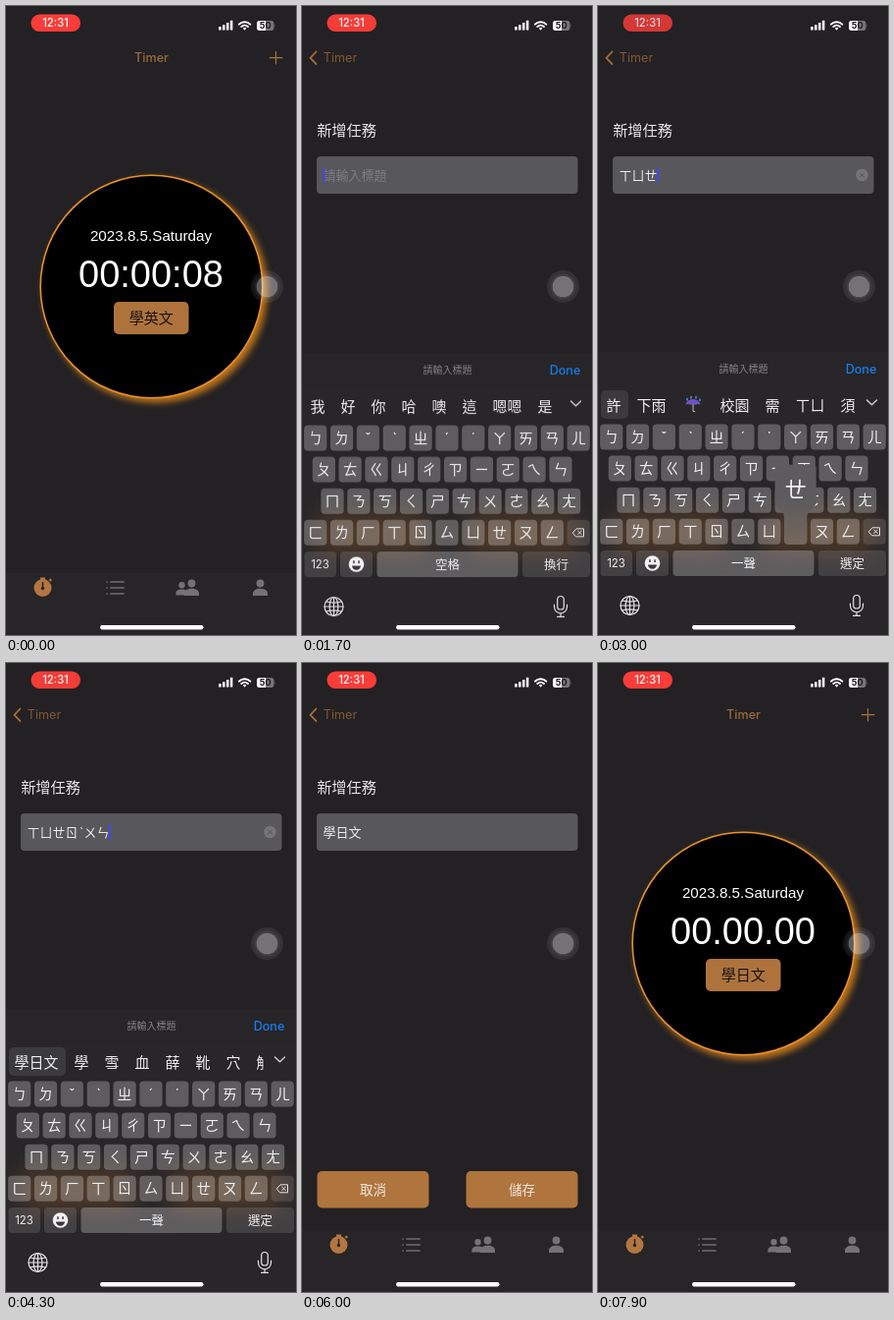
Animation, 296 px wide and 640 px high, one loop 8000 ms. Source, as an HTML page:

```html
<!DOCTYPE html>
<html lang="zh-Hant">
<head>
<meta charset="utf-8">
<title>Timer</title>
<style>
html, body { margin: 0; width: 100%; height: 100%; overflow: hidden; background: #232124; }
svg { display: block; width: 100vw; height: 100vh; }
text { font-family: Inter, "Noto Sans CJK TC", "Noto Sans CJK", sans-serif; text-anchor: middle; }
.helv { font-family: "Liberation Sans", Arial, sans-serif; fill: #fff; }
.line { fill: none; stroke-linecap: round; stroke-linejoin: round; }
.page, .under, .title, .back, .plus, .keys { animation: 8s infinite both; }
.page { animation-name: page; }
.under { animation-name: under; }
.title { animation-name: title; }
.back { animation-name: back; }
.plus { animation-name: plus; }
.keys { animation-name: keys; }
.pulse { animation: pulse 1s ease-in-out infinite alternate; }
/* push 600-1080 ms, pop 6080-6350 ms */
@keyframes page {
  0%, 7.5% { transform: translateX(296px); animation-timing-function: cubic-bezier(.2,.75,.25,1); }
  13.5%, 76% { transform: none; animation-timing-function: cubic-bezier(.2,.7,.25,1); }
  79.4%, 100% { transform: translateX(296px); }
}
@keyframes under {
  0%, 7.5% { transform: none; animation-timing-function: cubic-bezier(.2,.75,.25,1); }
  13.5%, 76% { transform: translateX(-89px); animation-timing-function: cubic-bezier(.2,.7,.25,1); }
  79.4%, 100% { transform: none; }
}
@keyframes title {
  0%, 7.5% { transform: none; opacity: 1; animation-timing-function: cubic-bezier(.2,.75,.25,1); }
  13%, 76% { transform: translateX(-109px); opacity: 0; animation-timing-function: cubic-bezier(.2,.7,.25,1); }
  79.4%, 100% { transform: none; opacity: 1; }
}
@keyframes back {
  0%, 7.5% { transform: translateX(109px); opacity: 0; animation-timing-function: cubic-bezier(.2,.75,.25,1); }
  12.5%, 76% { transform: none; opacity: 1; animation-timing-function: cubic-bezier(.2,.7,.25,1); }
  79.4%, 100% { transform: translateX(109px); opacity: 0; }
}
@keyframes plus {
  0%, 7.5% { opacity: 1; }
  10%, 76% { opacity: 0; }
  79.4%, 100% { opacity: 1; }
}
@keyframes keys {
  0%, 17% { transform: translateY(290px); animation-timing-function: cubic-bezier(.2,.75,.25,1); }
  22%, 65.6% { transform: none; animation-timing-function: cubic-bezier(.3,.6,.25,1); }
  70.6%, 100% { transform: translateY(290px); }
}
@keyframes pulse { to { opacity: .82; } }
</style>
</head>
<body>
<svg viewBox="0 0 296 640">
  <defs>
    <filter id="glow" x="-20%" y="-20%" width="140%" height="140%">
      <feDropShadow dx="4" dy="4" stdDeviation="3.5" flood-color="#e88a12" flood-opacity=".8"/>
    </filter>
    <filter id="soft" x="-30%" y="-100%" width="160%" height="300%"><feGaussianBlur stdDeviation="13"/></filter>
    <linearGradient id="warm" x2="0" y2="1">
      <stop offset=".45" stop-color="#5d5b5e"/>
      <stop offset="1" stop-color="#75675c"/>
    </linearGradient>
    <clipPath id="bar"><rect y="386" width="263" height="40"/></clipPath>
  </defs>
  <rect width="296" height="640" fill="#232124"/>

  <g class="under">
    <circle cx="148.5" cy="285.5" r="113.3" stroke="#e8912b" stroke-width="1.6" filter="url(#glow)"/>
    <text class="helv" x="148" y="239" font-size="15.2">2023.8.5.Saturday</text>
    <text class="helv" id="clock" x="148" y="286" font-size="38"></text>
    <rect x="110" y="301" width="76.5" height="33" rx="5" fill="#ae733d"/>
    <text id="task" x="148.3" y="323" font-size="15" fill="#17130f"></text>
  </g>

  <g class="page">
    <rect width="296" height="577" fill="#232124"/>
    <text x="45.5" y="132" font-size="15.2" fill="#e6e5e7">新增任務</text>
    <rect x="15" y="153" width="266.5" height="38" rx="4" fill="#58575b"/>
    <g id="field"></g>
    <g id="clear">
      <circle cx="269.5" cy="172" r="6.2" fill="#757479"/>
      <path class="line" d="M267.5 170l4 4m0-4l-4 4" stroke="#525156"/>
    </g>
    <rect id="caret" y="164" width="2" height="16" rx="1" fill="#3f49ea"/>
    <g font-size="13.5" fill="#f2e9e0">
      <rect x="15.5" y="517" width="114" height="37.5" rx="5" fill="#b0743d"/>
      <text x="72.5" y="540.5">取消</text>
      <rect x="167.5" y="517" width="114" height="37.5" rx="5" fill="#b0743d"/>
      <text x="224.5" y="540.5">儲存</text>
    </g>
  </g>

  <g fill="#9a6b3b" font-size="12.6">
    <text class="title" x="148.5" y="57" font-weight="500">Timer</text>
    <path class="plus line" d="M275.5 46.500v12.500M269.300 52.700h12.500" stroke="#a8733d" stroke-width="1.2"/>
    <g class="back">
      <text x="39" y="57.2" fill="#80592f">Timer</text>
      <path class="line" d="M14.5 46.5L8.5 52.8l6 6.3" stroke="#a56e3a" stroke-width="1.8"/>
    </g>
  </g>

  <g>
    <g class="pulse">
      <rect x="25.5" y="8.5" width="50.5" height="17.5" rx="8.7" fill="#fc3d39"/>
      <text x="50.5" y="21.2" font-size="11.2" font-weight="500" fill="#fff">12:31</text>
    </g>
    <path d="M218.4 21v3.4M222.3 19.2v5.2M226.2 17v7.4M230.1 14.8v9.6" stroke="#fff" stroke-width="2.5"/>
    <g class="line" stroke="#fff" stroke-width="2" stroke-linecap="butt">
      <path d="M237.9 18.6a8 8 0 0 1 11.4 0M240.3 21a4.7 4.7 0 0 1 6.6 0"/>
      <path d="M243.6 23.8l-1-1.2h2z" stroke-width="1.2"/>
    </g>
    <rect x="256" y="15" width="17.5" height="10" rx="3" fill="#77767a"/>
    <path d="M265 15h-6a3 3 0 0 0-3 3v4a3 3 0 0 0 3 3h6z" fill="#fff"/>
    <path d="M274.5 18.5q1.5 1.5 0 3z" fill="#77767a"/>
    <text x="264.8" y="23.4" font-size="9.2" font-weight="700" fill="#1c1b1d">50</text>
  </g>

  <g>
    <rect y="577" width="296" height="63" fill="#272528"/>
    <circle cx="37.5" cy="592" r="9" fill="#b3763f"/>
    <path d="M35 581.5h5v3h-5zM43.5 584l2-1.6 1.5 1.6-1.6 1.8z" fill="#b3763f"/>
    <path class="line" d="M37.5 586.5v5.5" stroke="#272528" stroke-width="1.5"/>
    <circle cx="37.5" cy="592.5" r="1.7" fill="#272528"/>
    <path class="line" d="M107 586h13M107 592h13M107 598h13M103 586h.1M103 592h.1M103 598h.1" stroke="#6f6e72" stroke-width="1.7"/>
    <g id="people" fill="#737276"></g>
  </g>

  <g class="keys">
    <rect y="386" width="296" height="254" fill="#282629"/>
    <g fill="#a9682b" opacity=".34" filter="url(#soft)">
      <rect x="16" y="517" width="114" height="37"/>
      <rect x="168" y="517" width="114" height="37"/>
    </g>
    <rect y="352" width="296" height="34" fill="#272528"/>
    <text x="148.5" y="373" font-size="10" fill="#818085">請輸入標題</text>
    <text x="268.5" y="373.7" font-size="12.6" font-weight="500" fill="#157fee">Done</text>
    <path class="line" d="M274.5 401l5 4.8 5-4.8" stroke="#c9c8ca" stroke-width="1.5"/>
    <g id="words" clip-path="url(#bar)"></g>
    <g id="caps"></g>
    <g class="line" stroke="#e4e3e5" stroke-width="1.2">
      <circle cx="32.5" cy="610" r="9.5"/>
      <ellipse cx="32.5" cy="610" rx="4.4" ry="9.5"/>
      <path d="M32.5 600.5v19M23 610h19M24.8 605q7.7 2.2 15.4 0M24.8 615q7.7-2.2 15.4 0"/>
      <rect x="260.7" y="599.5" width="6.6" height="13.5" rx="3.3"/>
      <path d="M257.5 608v2.3a6.5 6.5 0 0 0 13 0V608M264 617v3.3M260.5 620.3h7"/>
    </g>
    <g id="popup">
      <path fill="url(#warm)"/>
      <text font-size="23" fill="#f3f2f4"></text>
    </g>
  </g>

  <rect x="96" y="630" width="105.5" height="4.4" rx="2.2" fill="#fff"/>
  <g fill="#fff">
    <circle cx="266.5" cy="285.5" r="16.5" opacity=".08"/>
    <circle cx="266.5" cy="285.5" r="13" opacity=".06"/>
    <circle cx="266.5" cy="285.5" r="10.8" opacity=".28"/>
  </g>
</svg>
<script>
const $ = id => document.getElementById(id);

function add(parent, tag, attrs, text) {
  const node = document.createElementNS("http://www.w3.org/2000/svg", tag);
  for (const k in attrs) node.setAttribute(k, attrs[k]);
  if (text) node.textContent = text;
  return parent.appendChild(node);
}
const label = (parent, s, x, y, size, fill = "#efeef0") =>
  add(parent, "text", { x, y: y + size * .37, "font-size": size, fill }, s);

// Tab bar people
function person(x, y, k) {
  const g = add($("people"), "g", { transform: `translate(${x} ${y}) scale(${k})` });
  add(g, "circle", { cy: -4, r: 3.9 });
  add(g, "path", { d: "M-7.5 8.5v-2.2c0-3.4 3.4-5 7.5-5s7.5 1.6 7.5 5v2.2z" });
}
person(179.5, 592.5, .82);
person(189.5, 591.5, 1);
person(259.5, 591.5, 1);

// Keyboard
const PITCH = 26.85;
const rows = [
  [13.7, "ㄅㄉˇˋㄓˊ˙ㄚㄞㄢㄦ"],
  [22.3, "ㄆㄊㄍㄐㄔㄗㄧㄛㄟㄣ"],
  [31, "ㄇㄋㄎㄑㄕㄘㄨㄜㄠㄤ"],
  [13.7, "ㄈㄌㄏㄒㄖㄙㄩㄝㄡㄥ"]
];
const caps = $("caps"), spot = {};
const cap = (x, y, w, light) =>
  add(caps, "rect", { x, y, width: w, height: 26, rx: 4, fill: "#fff", "fill-opacity": light ? .25 : .12 });

rows.forEach(([x0, chars], r) => [...chars].forEach((ch, i) => {
  const x = x0 + i * PITCH, y = 438.5 + r * 32.1;
  spot[ch] = { x, y };
  cap(x - 11.6, y - 13, 23.2, true);
  label(caps, ch, x, y, 15);
}));
cap(270.6, 521.8, 23.2, false);
add(caps, "path", { class: "line", stroke: "#e4e3e5", d: "M276.5 534.8l3.5-4h7.5v8h-7.5zM281.7 533l3.6 3.6m0-3.6l-3.6 3.6" });
cap(2.5, 554, 32.5, false);
label(caps, "123", 18.5, 567, 11.4);
cap(39, 554, 33, false);
add(caps, "circle", { cx: 55.5, cy: 567, r: 7.8, fill: "#f0eff1" });
add(caps, "path", { fill: "#39373a", d: "M51 568.5h9a4.5 4.2 0 0 1-9 0zM52.2 563.3h1.5v2.6h-1.5zM57.3 563.3h1.5v2.6h-1.5z" });
cap(76.5, 554, 144, true);
const space = label(caps, "", 148.5, 567, 12.5);
cap(225, 554, 69, false);
const enter = label(caps, "", 259.5, 567, 12.5);

// Typing: time, text in field, pressed key, suggestions
const later = "學日文 學 雪 血 薛 靴 穴 觧";
const steps = [
  [0, "", "", "我 好 你 哈 噢 這 嗯嗯 是"],
  [2400, "ㄒ", "ㄒ", "下 小 想 先 謝謝 學 新 線"],
  [2690, "ㄒㄩ", "ㄩ", "許 需 須 學 徐 虛 ㄒㄩ 續"],
  [2940, "ㄒㄩㄝ", "ㄝ", "許 下雨 ☂ 校園 需 ㄒㄩ 須"],
  [3300, "ㄒㄩㄝㄖ", "ㄖ", "學日 學 雪 血 薛 靴 穴 觧"],
  [3570, "ㄒㄩㄝㄖˋ", "ˋ", "學日 學 雪 血 薛 靴 穴 觧"],
  [3840, "ㄒㄩㄝㄖˋㄨ", "ㄨ", later],
  [4080, "ㄒㄩㄝㄖˋㄨㄣ", "ㄣ", later],
  [4450, "學日文", "", "的 了 和 是 也 跟 就是 嗎"]
];

function umbrella(parent, x) {
  const g = add(parent, "g", { transform: `translate(${x} 406)`, class: "line" });
  add(g, "path", { d: "M-7.5 0a7.5 6 0 0 1 15 0q-2.5-2-5 0-2.5-2-5 0-2.5-2-5 0z", fill: "#7150c8" });
  add(g, "path", { d: "M0-1v6.5q0 1.5 1.7 1", stroke: "#a9a6b0", "stroke-width": 1.2 });
  add(g, "path", { d: "M-6-6.5v1.5M-2-8.5v1.5M3-8.5v1.5M7-6v1.5", stroke: "#5aa2e0", "stroke-width": 1.4 });
}

function showWords(list, composing) {
  const box = $("words");
  box.replaceChildren();
  let x = 8.5;
  list.split(" ").forEach((word, i) => {
    const w = word === "☂" ? 23 : word.length * 15;
    if (composing && !i)
      add(box, "rect", { x: 3, y: 391, width: w + 13, height: 29, rx: 5, fill: "#fff", "fill-opacity": .09 });
    if (word === "☂") umbrella(box, x + w / 2);
    else label(box, word, x + w / 2, 406, 15);
    x += w + 16;
  });
}

function showField(text) {
  const box = $("field");
  box.replaceChildren();
  let x = 21.5;
  for (const ch of text || "請輸入標題") {
    const w = ch === "ˋ" ? 6 : 13;
    label(box, ch, x + w / 2, 172, 13, text ? "#efeef0" : "#7c7b80");
    x += w;
  }
  $("caret").setAttribute("x", text ? x - .5 : 21.5);
}

function showPopup(ch) {
  const [shape, glyph] = $("popup").children, { x, y } = spot[ch];
  const top = y - 68;
  shape.setAttribute("d", `M${x - 17} ${top}h34q4 0 4 4v33c0 8-9.4 8-9.4 17v23q0 4-4 4h-15.2q-4 0-4-4v-23c0-9-9.4-9-9.4-17v-33q0-4 4-4z`);
  glyph.setAttribute("x", x);
  glyph.setAttribute("y", top + 33);
  glyph.textContent = ch;
}

const show = (id, on) => $(id).style.display = on ? "" : "none";
let last = "";

function draw(t) {
  const n = steps.findLastIndex(s => t >= s[0]);
  const [at, text, key, list] = steps[n];
  const pressed = key && t < at + 170;
  const editing = t >= 1360 && t < 5250;
  const saved = t >= 5900;
  const state = [n, pressed, editing, saved].join();
  if (state === last) return;
  last = state;

  const composing = key !== "";
  showField(text);
  showWords(list, composing);
  space.textContent = composing ? "一聲" : "空格";
  enter.textContent = composing ? "選定" : "換行";
  show("caret", editing);
  show("clear", editing && text);
  show("popup", pressed);
  if (pressed) showPopup(key);
  $("clock").textContent = saved ? "00.00.00" : "00:00:08";
  $("task").textContent = saved ? "學日文" : "學英文";
}

const start = performance.now();
function tick() {
  draw((performance.now() - start) % 8000);
  requestAnimationFrame(tick);
}
tick();
</script>
</body>
</html>
```
